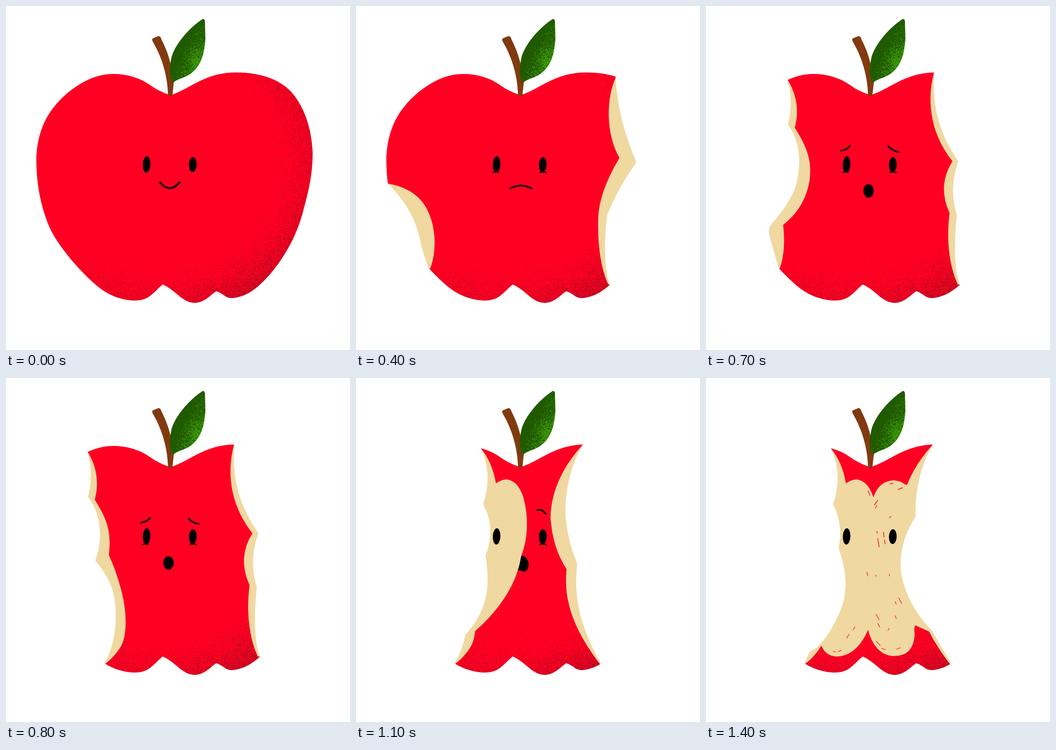
An HTML page with a canvas that plays this animation: 709x709 px, repeating every 1.6 s.

```html
<!DOCTYPE html>
<html lang="en">
<head>
<meta charset="utf-8">
<title>Apple being eaten</title>
<style>
html, body { margin: 0; width: 100%; height: 100%; overflow: hidden; background: #fff; }
canvas { display: block; width: 100vmin; height: 100vmin; }
</style>
</head>
<body>
<canvas id="stage" width="709" height="709"></canvas>
<script>
const SIZE = 709, LOOP = 1600;
const RED = '#ff0023', FLESH = '#f0d8a1';
const ctx = document.getElementById('stage').getContext('2d');

const apple = 'M339 184Q313 175 297 163C276 148 250 140 220 140C172 140 125 175 99 208' +
  'C73 240 63 279 62.5 318C63 372 73 420 93 463C115 505 157 551 189 578C212 597 240 607 266 607' +
  'C296 607 303 590 323 574C352 587 362 611 389 612C409 611 419 598 433 588' +
  'C449 592 450 602 466 602C498 600 522 578 545 552C580 510 600 468 611 428' +
  'C625 378 632 345 632 302C630 252 615 208 588 177C562 149 520 137 475 137C410 137 385 168 339 184Z';
const stem = 'M302 67L314 62Q319 62 320 68C333 93 339 115 341 130L346 156L343 184Q339 188 334 184' +
  'C333 150 325 113 304 76Q300 70 302 67Z';
const leaf = 'M405 27C376 46 348 80 341 106Q335 135 340 152L345 158C355 148 372 149 387 134' +
  'C404 118 409 95 411 68L410 31Q409 26 405 27Z';

// A bitten edge: start, end, outer rim of the flesh, inner rim where the skin begins.
const edge = (from, to, outer, inner) => ({ from, to, outer, inner });

const leftTop = 'C276 185 274 225 262 260';
const leftSkin = 'Q280 172 288 215C292 260 282 300 249 342Q256 385 234 428C250 480 250 530 237 553Q225 573 205 589';
const midOuter = 'C200 285 195 345 182 380Q166 415 133 452Q127 462 133 482L150 541';
const midInner = 'C208 290 218 318 214 355C208 400 186 430 159 451Q165 505 152 541';
const left = [
  null,
  edge([66, 366], [150, 541],
    'C98 398 122 435 131 478Q139 515 150 541',
    'C106 373 136 392 150 427C165 460 166 508 153 541'),
  edge([98, 208], [150, 541], 'Q150 222 169 245' + midOuter, 'Q162 222 183 251' + midInner),
  edge([168, 152], [150, 541], 'Q181 200 169 245' + midOuter, 'C186 180 193 215 183 251' + midInner),
  edge([168, 152], [203, 588],
    'Q181 200 169 245C200 285 198 340 184 376Q208 405 218 432C230 465 232 540 203 588',
    'C186 180 193 215 183 251C208 290 218 318 212 365Q226 395 236 432C250 480 250 530 237 553Q225 573 205 589'),
  edge([258, 146], [203, 588],
    'C276 180 275 222 263 258Q250 292 222 328Q236 355 230 390Q225 415 217 430C230 465 232 540 203 588', leftSkin),
  edge([258, 146], [203, 588],
    leftTop + 'Q289 308 267 366C277 430 272 478 225 530Q220 560 203 588', leftSkin),
  edge([258, 146], [203, 588],
    leftTop + 'Q284 305 273 350C292 400 292 450 275 484Q255 530 228 556L214 564L203 588', leftSkin)
];

const lowOuter = 'C511 480 511 540 523 574', lowInner = 'C498 490 504 540 520 574';
const rightTop = 'C440 185 430 240 432 285';
const rightSkin = 'C430 178 402 230 401 288Q405 350 434 394C427 460 450 520 503 590';
const right = [
  null,
  edge([631, 290], [523, 574], 'Q555 350 518 430' + lowOuter, 'Q510 350 499 440' + lowInner),
  edge([535, 148], [523, 574],
    'Q540 235 578 322Q540 375 518 430' + lowOuter,
    'C516 190 514 262 543 313Q500 385 499 440' + lowInner),
  edge([470, 137], [523, 574],
    'C466 215 483 265 520 320Q500 375 517 432' + lowOuter,
    'C452 205 468 270 508 320Q476 370 502 427C495 480 501 535 519 574'),
  edge([467, 138], [506, 590],
    rightTop + 'Q436 335 456 383C449 445 457 505 506 590', rightSkin),
  edge([467, 138], [506, 590],
    rightTop + 'Q400 335 401 388C404 440 435 490 465 520Q480 545 506 590', rightSkin)
];

// Flesh showing on the front.
const lobeL = 'M289 217Q300 209 311 209Q334 212 345 246';
const lobes = lobeL + 'Q357 211 388 211Q402 212 411 220L500 220';
const slopeL = 'C333 415 305 470 245 522L200 522L200 217Z';
const bottomL = 'Q310 574 268 574Q246 572 238 552L190 552L190 217Z';
const front = [
  null,
  lobeL + 'Q362 310 340 369' + slopeL,
  lobes + 'L500 523L462 523C375 490 347 405 340 369' + slopeL,
  lobes + 'L500 523L462 523C392 496 360 440 347 400Q352 470 334 519' + bottomL,
  lobes + 'L500 525L465 525L432 510Q428 511 430 530Q427 573 388 573C360 573 342 550 334 519' + bottomL
];

const streaks = 'M334 233L338 242M347 262L354 252M349 268L352 263M379 218L385 217M396 230L405 226' +
  'M378 288L381 285M352 316L353 320M354 331L357 348M366 318L367 328M368 334L369 342M391 326L391 334';
const streaksMid = 'M389 458L404 475M397 474L414 488M380 448L386 458M440 504L447 510';
const streaksLow = 'M332 400L333 408M350 406L350 409M378 404L378 408M397 453L403 464M390 461L392 466' +
  'M350 487L357 498M354 506L358 513M390 490L392 496M375 520L378 516M290 536L295 528M303 519L307 513' +
  'M351 543L359 551M362 557L370 560M393 559L400 556M262 563L267 565M273 564L279 561';

const lashes = 'M282 343Q288 341 293 343M379 343Q385 341 392 343';
const browsLow = 'M278 298Q290 297 297 288M376 289Q383 298 397 301';
const browsMid = 'M281 288Q290 284 299 279M375 280Q384 285 394 291';
const browsHigh = 'M286 277Q292 270 303 271M373 272Q385 270 391 280';
const oval = (x, y, rx, ry) =>
  `M${x - rx} ${y}A${rx} ${ry} 0 1 1 ${x + rx} ${y}A${rx} ${ry} 0 1 1 ${x - rx} ${y}Z`;
const wail = 'M314 385C314 358 356 358 356 385Q354 399 345 399L336 396Q326 400 322 397Q314 395 314 385Z';

const faces = {
  smile: { mouth: 'M317 363Q338 388 358 363', w: 3.8 },
  calm: { mouth: 'M318 371Q339 383 360 371', w: 3 },
  flat: { mouth: 'M318 374Q339 376 361 374', w: 3 },
  frown: { mouth: 'M318 376Q340 364 362 376', w: 3.5, lash: 1 },
  sad: { mouth: 'M319 378Q340 362 361 378', w: 3.5, lash: 1 },
  worry: { open: oval(337, 379, 8, 9), brows: browsLow, lash: 1 },
  oh: { open: oval(335, 381, 10.5, 14), brows: browsLow, lash: 1 },
  gasp: { open: oval(335, 382, 14, 15), brows: browsMid, lash: 1 },
  cry: { open: wail, brows: browsHigh, lash: 1 }
};

// left edge, right edge, front bite, face
const steps = [
  [0, 0, 0, 'smile'], [1, 0, 0, 'calm'], [1, 1, 0, 'flat'], [1, 2, 0, 'frown'],
  [2, 2, 0, 'sad'], [3, 2, 0, 'worry'], [3, 3, 0, 'oh'], [4, 3, 0, 'oh'],
  [5, 3, 0, 'gasp'], [5, 4, 0, 'cry'], [6, 4, 1, 'cry'], [6, 5, 2, 'cry'],
  [7, 5, 3, 'cry'], [7, 5, 4, 'cry']
];

let seed = 7;
function rand() {
  seed = (Math.imul(seed, 1664525) + 1013904223) >>> 0;
  return seed / 4294967296;
}

// A filled shape with pixel grain; density(x, y) is the chance of a dot.
function grainy(path, fill, dot, [x0, y0, x1, y1], density) {
  const layer = document.createElement('canvas');
  layer.width = layer.height = SIZE;
  const g = layer.getContext('2d');
  g.fillStyle = fill;
  g.fill(new Path2D(path));
  g.globalCompositeOperation = 'source-atop';
  g.fillStyle = dot;
  for (let y = y0; y < y1; y++)
    for (let x = x0; x < x1; x++)
      if (rand() < density(x, y)) g.fillRect(x, y, 1, 1);
  return layer;
}

const body = grainy(apple, RED, '#b00a1e', [60, 135, 634, 614], (x, y) => {
  const r = Math.hypot((x - 300) / 332, (y - 320) / 290);
  return 0.005 + 0.38 * Math.max(0, (r - 0.7) / 0.33) ** 2.5;
});
const stalk = grainy(stem, '#843b10', '#6f300c', [300, 60, 348, 188], () => 0.12);
const blade = grainy(leaf, '#205a00', '#3fa00c', [336, 25, 413, 160], (x, y) => {
  const across = (x - 345) * 0.896 + (y - 155) * 0.444;
  const glow = Math.exp(-(((x - 394) / 18) ** 2) - ((y - 115) / 26) ** 2);
  return Math.max(0, Math.min(1, (across + 10) / 42)) * 0.4 + glow * 0.4;
});

function fill(d, color) {
  ctx.fillStyle = color;
  ctx.fill(new Path2D(d));
}

function stroke(d, color, width) {
  ctx.strokeStyle = color;
  ctx.lineWidth = width;
  ctx.stroke(new Path2D(d));
}

// Fills everything from a rim out to the side of the stage.
function beyond(e, rim, farX, color) {
  if (!e) return;
  const [x, y] = e.from, [ex, ey] = e.to;
  const top = y < 200 ? 100 : y;
  fill(`M${farX} ${top}L${x} ${top}L${x} ${y}${e[rim]}L${ex} ${ey}L${ex} 660L${farX} 660Z`, color);
}

function drawFace(f) {
  if (f.mouth) stroke(f.mouth, '#000', f.w);
  if (f.open) fill(f.open, '#000');
  if (f.brows) stroke(f.brows, '#000', 3.2);
  if (f.lash) stroke(lashes, '#000', 2.4);
}

function eye(x, y, rx, ry) {
  ctx.beginPath();
  ctx.ellipse(x, y, rx, ry, 0.04, 0, 2 * Math.PI);
  ctx.fillStyle = '#000';
  ctx.fill();
}

function draw([l, r, f, face]) {
  ctx.fillStyle = '#fff';
  ctx.fillRect(0, 0, SIZE, SIZE);
  ctx.lineCap = 'round';
  ctx.drawImage(body, 0, 0);
  beyond(left[l], 'inner', 0, FLESH);
  beyond(right[r], 'inner', SIZE, FLESH);
  drawFace(faces[face]);
  if (f) fill(front[f], FLESH);
  if (f > 1) stroke(streaks, RED, 1.4);
  if (f === 2 || f === 3) stroke(streaksMid, RED, 1.4);
  if (f === 4) stroke(streaksLow, RED, 1.2);
  beyond(left[l], 'outer', 0, '#fff');
  beyond(right[r], 'outer', SIZE, '#fff');
  eye(289.8, 326.5, 7.8, 16.8);
  eye(385, 327, 8, 15.2);
  ctx.drawImage(stalk, 0, 0);
  ctx.drawImage(blade, 0, 0);
}

let shown = -1;
function tick() {
  const t = performance.now() % LOOP;
  const i = Math.max(0, Math.min(steps.length - 1, Math.floor(t / 100) - 1));
  if (i !== shown) draw(steps[shown = i]);
  requestAnimationFrame(tick);
}
tick();
</script>
</body>
</html>
```
